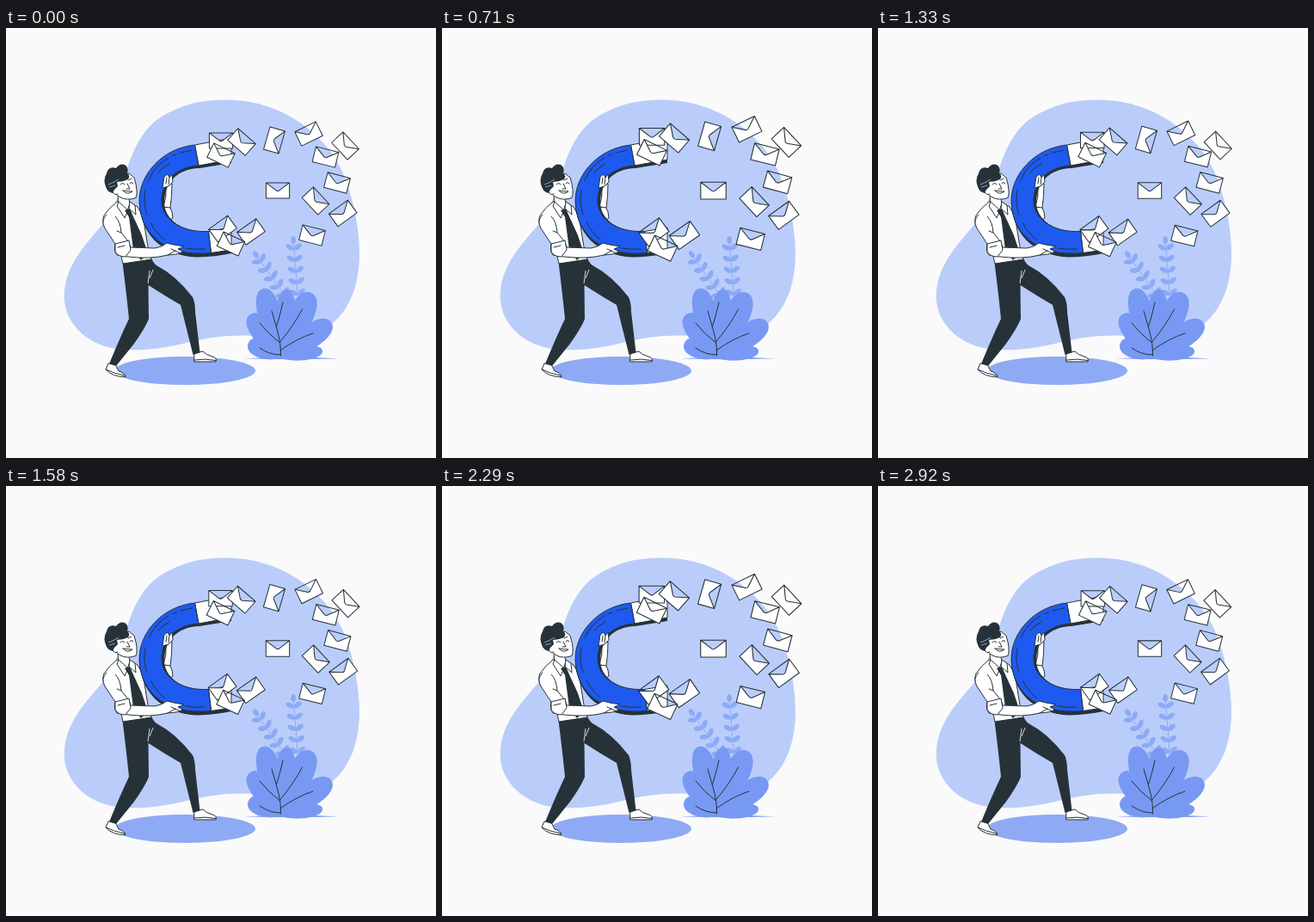
Animation of 500x500 px, one loop 2.96 s. Source, as an HTML page:

```html
<!DOCTYPE html>
<html lang="en">
<head>
<meta charset="utf-8">
<title>Mail magnet</title>
<style>
  html, body { margin: 0; width: 100%; height: 100%; overflow: hidden; background: #fafafa; }
  svg { display: block; width: 100vw; height: 100vh; }
  .ink { fill: none; stroke: #263238; stroke-width: 1; stroke-linecap: round; stroke-linejoin: round; }
  .paper { fill: #fff; stroke: #263238; stroke-width: 1; stroke-linejoin: round; }
  .dark { fill: #263238; }
  .blue { fill: #1e5af0; stroke: #263238; stroke-width: 1; }
</style>
</head>
<body>
<svg viewBox="0 0 500 500">
  <path fill="#bacdfa" d="M190 98C213 86 237 83 257 83.500C292 84 322 95 346 113C376 136 390 158 399 188C407 214 411 240 411 266C410 298 401 326 378 345C360 361 330 359 296 358C263 356 237 359 210 366C178 374 152 376 128 373C92 368 64 340 68 305C71 276 90 254 110 231C128 210 132 190 141 163C152 130 165 110 190 98Z"/>
  <ellipse cx="208" cy="398.500" rx="82" ry="16.500" fill="#8faaf4"/>

  <g id="ferns" fill="#8daaf6" stroke="#8daaf6"></g>
  <path fill="#7597f2" d="M277 384.300Q332 381.500 387 384.300Q332 386 277 384.300Z"/>
  <g id="leaves" fill="#7899f3"></g>
  <path class="ink" d="M319.500 381Q320 367 315 350L309 329M322 319Q319 333 314.500 347M318.500 365Q334 347 344.500 327M318.500 366Q305 356 295 343M319 375Q338 361 357 355M319 380Q306 380 295 372"/>

  <!-- far arm -->
  <path class="paper" d="M176 214Q184 207 190 207Q194 214 194 221Q186 226 176 229Z"/>
  <path class="paper" d="M183 208Q187 196 186 184L193 181Q193 196 191 209Z"/>

  <!-- legs and shoes -->
  <path class="paper" d="M119 390L116 397Q124 406 139 405.500Q138 401 131 399L127 391Z"/>
  <path class="ink" d="M116 397Q126 402 138 404"/>
  <path class="paper" d="M219 378L218.500 388H244Q246 384 240 382Q232 380 229 376Z"/>
  <path class="ink" d="M219 386Q232 384 244 386.500"/>
  <path class="dark" d="M135.500 273L169 268Q172 274 175 276Q198 288 217 313Q220 319 220 330L225.500 377.500L217.500 380L203 322Q184 311 165.500 299L166 338Q163 347 149 367L128 393L120 390.500Q133 359 143 338Q139 300 135.500 273Z"/>
  <path d="M167 282L165 297M171 281L167 291" stroke="#fff" stroke-width=".8" fill="none"/>

  <!-- torso and tie -->
  <path class="paper" d="M129 202Q119 210 114 218Q111 225 115 232L130 248L136 274L169 269Q164 254 162 236Q160 219 153 208L143 202Z"/>
  <path class="paper" d="M130 194L131 210L140 216L144 204L142 194Z"/>
  <path class="paper" d="M131 202L129 207L138 221L142 212ZM144 202L150 206L151 217L143 210Z"/>
  <path class="dark" d="M138 212L144 210L147 217L158 241L165 262L157 270L148 258L143 220Z"/>

  <!-- head -->
  <path class="paper" d="M125 180Q125 193 133 197Q141 201 151 197.500Q154 190 149 174L143 169L128 174Z"/>
  <path class="paper" d="M126 184Q121 185 124 191Q126 195 130 193"/>
  <path class="dark" d="M117 187Q112 177 117 169Q119 160 128 163Q132 157 138 159Q143 162 141 169Q145 172 142 176Q136 179 129 179L130 184L126 188L124 192Q119 191 117 187Z"/>
  <path d="M119 182Q125 180 131 176M120 185L127 183" stroke="#bacdfa" stroke-width=".7" fill="none"/>
  <path class="ink" d="M133 182Q136 179 138 182M144 181Q146 178 148 181M134 178L137 177M142 177L146 175M141 181L144 187L140 187M136 189Q141 195 147 190Q142 190 136 189"/>

  <!-- magnet -->
  <path class="dark" d="M220 138L262 129V157L225 163C198 164 185 180 184 202C184 222 203 237 236 238L262 234V262Q244 266 222 266.500C180 265 155 238 155 200Z"/>
  <path class="paper" d="M219.500 136L262 128V153L224 160ZM235.500 236.500L262 232V258L238.500 261.500Z"/>
  <path class="blue" d="M219.500 136C181 140 154.500 171 155 202C156 241 188 267 238.500 261.500L235.500 236.500C204 238 181 223 181 200C182 178 197 162 224 160Z"/>
  <path class="ink" d="M166 177Q173 160 189 151M193 149L198 147M203 145L216 142M162 188Q159 203 164 217M168 226Q174 238 184 246M209 256Q221 258 231 257M190 158Q182 162 177 168"/>

  <!-- near arm and hands -->
  <path class="paper" d="M117 217Q110 224 115 233L127 251Q125 259 129 264L142 266Q169 269 188 264Q199 264 206 260L200 257L207 254L195 252L187 250Q181 255 173 256L145 255L143 249L134 238Q133 225 127 219"/>
  <path class="paper" d="M127 251L143 247L145 258L139 266Q130 266 127 260Z"/>
  <path class="ink" d="M129 236L134 238M188 264L197 259M192 257L201 261M130 255L138 253"/>
  <path class="paper" d="M182 186L184 173L188 170L190 174L193 170L194 179L189 184Z"/>
  <path class="ink" d="M187 174L186 181M190 174L189 182"/>

  <g id="mail"></g>
</svg>
<script>
  const byId = id => document.getElementById(id);

  // Each leaf grows from one root: tip x, tip y, half width
  const root = [319, 384];
  const leaf = ([x, y, w]) => {
    const [rx, ry] = root, len = Math.hypot(x - rx, y - ry);
    const angle = Math.atan2(y - ry, x - rx) * 180 / Math.PI;
    return `<path transform="translate(${rx} ${ry}) rotate(${angle})"
      d="M0 0C${len * .4} ${-w} ${len} ${-w} ${len} 0C${len} ${w} ${len * .4} ${w} 0 0Z"/>`;
  };
  byId('leaves').innerHTML = [
    [299, 303, 18], [327, 304, 15], [355, 308, 20], [284, 333, 17],
    [378, 342, 18], [282, 366, 14], [368, 375, 10]
  ].map(leaf).join('');

  // A fern is a stem with pairs of small leaves
  const fern = (x1, y1, x2, y2, pairs) => {
    const angle = Math.atan2(y2 - y1, x2 - x1) * 180 / Math.PI;
    const blade = (x, y, turn, r) =>
      `<ellipse cx="${r}" rx="${r}" ry="2.900" stroke="none" transform="translate(${x} ${y}) rotate(${angle + turn})"/>`;
    let out = `<path d="M${x1} ${y1}L${x2} ${y2}" stroke-width="1"/>` + blade(x2, y2, 0, 4.5);
    for (let i = 0; i < pairs; i++) {
      const k = (i + .9) / (pairs + .4), x = x1 + (x2 - x1) * k, y = y1 + (y2 - y1) * k;
      out += blade(x, y, 58, 5.3) + blade(x, y, -58, 5.3);
    }
    return out;
  };
  byId('ferns').innerHTML = fern(340, 322, 334.500, 251, 5) + fern(330, 320, 293, 267, 5);

  // Envelopes: centre x, centre y, rotation
  const envelopes = [
    [250, 131, 0], [274, 132.500, 41], [250, 148, 26], [316, 189, 0], [312, 130.500, 106],
    [352, 123, -26], [394.500, 137, 47], [371.500, 150, 14], [385, 180, 15], [360, 201, 47],
    [391.700, 215.500, -36], [356, 241, 14], [285, 237, -35], [252, 233.500, -36], [261.500, 251, 25]
  ];
  byId('mail').innerHTML = envelopes.map(([x, y, a]) =>
    `<g transform="translate(${x} ${y}) rotate(${a})"><path class="paper" stroke-width="1.100"
      d="M-13.600 -9.100H13.600V9.100H-13.600ZL-1.500 .2Q0 1 1.500 .2L13.600 -9.100"/></g>`).join('');

  const LOOP = 2960, PEAK = 590, GROWTH = .09;
  const ease = u => (u + (1 - Math.cos(Math.PI * u)) / 2) / 2;

  // Swell and shrink, then the same in reverse
  function draw(now) {
    const t = now % LOOP, half = LOOP / 2, p = Math.min(t, LOOP - t);
    const swell = p < PEAK ? ease(p / PEAK) : ease((half - p) / (half - PEAK));
    byId('mail').setAttribute('transform',
      `translate(322 187.300) scale(${1 + GROWTH * swell}) translate(-322 -187.300)`);
  }
  const start = performance.now();
  function tick() {
    draw(performance.now() - start);
    requestAnimationFrame(tick);
  }
  tick();
</script>
</body>
</html>
```
